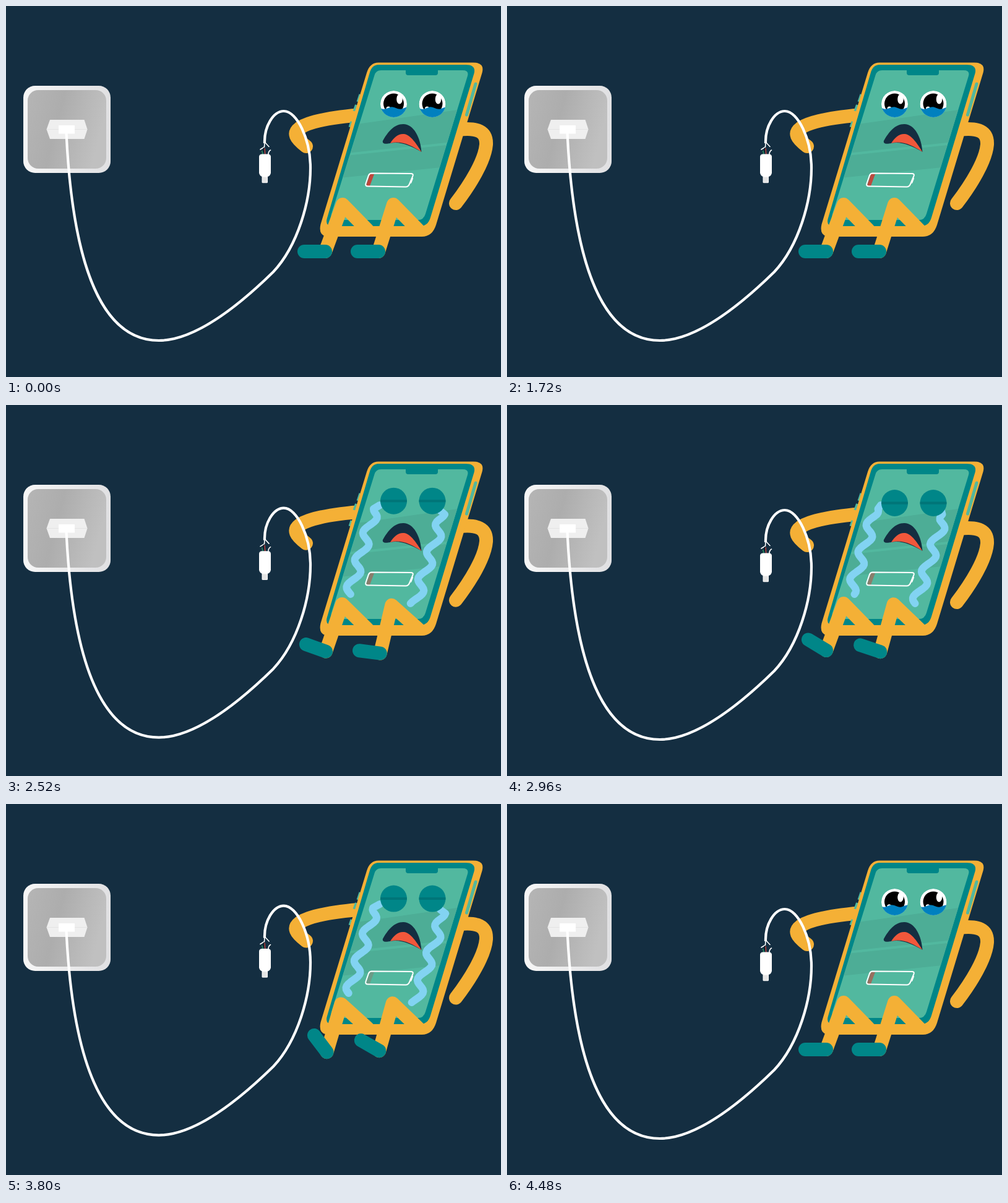
Recreate the animation shown at these times as an HTML page. Size 800 px wide and 600 px high, loop 4520 ms.

```html
<!DOCTYPE html>
<html lang="en">
<head>
<meta charset="utf-8">
<title>Crying phone</title>
<style>
html, body { margin: 0; width: 100%; height: 100%; overflow: hidden; background: #142e41; }
svg { display: block; width: 100vw; height: 100vh; }
.limb { fill: none; stroke: #f4b036; stroke-width: 22; stroke-linecap: round; stroke-linejoin: round; }
.shoe { stroke: #008688; stroke-width: 22; stroke-linecap: round; }
.tear { fill: none; stroke: #82d3f2; stroke-width: 12; stroke-linecap: round; stroke-linejoin: round; }
.wire { fill: none; stroke: #fff; stroke-width: 1.6; stroke-linecap: round; }
</style>
</head>
<body>
<svg viewBox="0 0 800 600">
  <defs>
    <linearGradient id="frame"><stop stop-color="#f6f6f6"/><stop offset="1" stop-color="#e0e0e2"/></linearGradient>
    <linearGradient id="plate" y2=".25"><stop stop-color="#b5b5b5"/><stop offset=".45" stop-color="#adadad"/><stop offset="1" stop-color="#c0c0c0"/></linearGradient>
    <clipPath id="ball"><circle r="21.5"/></clipPath>
    <clipPath id="shut"><rect id="shutBox" x="-23" y="-22" width="46" height="0"/></clipPath>
    <path id="screen" d="M606 104 H738 Q748.500 104 746 113 L678 336 Q675 346 666 346 H532 Q523 346 526 336 L595.500 112 Q598 104 606 104Z"/>
    <clipPath id="glass"><use href="#screen"/></clipPath>
    <g id="eye">
      <g id="open" clip-path="url(#ball)">
        <circle r="21.5" fill="#fff"/>
        <circle cy="-.5" r="16.500"/>
        <ellipse id="shine" cx="9.500" cy="-8" rx="4.800" ry="8" fill="#fff"/>
        <circle id="spark" cx="-9" cy="7" r="3.500" fill="#fff"/>
        <path id="water" fill="#0080bf"/>
      </g>
      <g clip-path="url(#shut)">
        <circle r="21.5" fill="#008688"/>
        <path d="M-21.400 0H21.400" stroke="#007578" stroke-width="4"/>
      </g>
    </g>
  </defs>

  <g id="arms">
    <path class="limb" d="M580 175.500 C535 179 493 185 475 197 C463 206 468 214 485 227"/>
    <path class="limb" d="M730 200 C762 196 777 203 776 224 C774 250 750 289 727 319"/>
  </g>

  <path d="M573 143 L569 155 M566.500 160 L563 170 M559 187 L556 196" stroke="#4fb89f" stroke-width="5"/>
  <path fill="#f4b036" d="M602 91.500 H755 Q774 91.500 769.500 108 L695 354 Q689 373 672 373 H522 Q504 373 508.500 353 L583 108 Q588 91.500 602 91.500Z"/>
  <path d="M759 126 L744.500 176" stroke="#52b89f" stroke-width="5" stroke-linecap="round"/>
  <path fill="#008688" d="M602 95 H743 Q760 95 756.500 109 L686 342 Q682 356 669 356 H528 Q515 356 519 343 L587.500 109 Q591 95 602 95Z"/>
  <use href="#screen" fill="#52b89f"/>
  <g clip-path="url(#glass)" fill="#4dad96">
    <path d="M540 195 L750 165 V217 L540 239Z M540 243 L750 221 V256 L540 278Z"/>
  </g>
  <path fill="#008688" d="M646 103 H698 V108 Q698 112 694 112 H650 Q646 112 646 108Z"/>

  <path class="tear" id="tearL"/>
  <path class="tear" id="tearR"/>
  <g id="eyes">
    <use href="#eye" x="626.500" y="158.500"/>
    <use href="#eye" x="689" y="158.500"/>
  </g>

  <path fill="#142e41" d="M609 218 C617 204 627 191 642 191 C659 191 670 213 671.500 236 C655 226 635 218 621 222 C611 224 608 222 609 218Z"/>
  <path fill="#f1573b" d="M621 222 C627 212 635 206 643 207 C654 208 664 224 671.500 236 C655 225 638 217 621 222Z"/>

  <path id="charge" fill="#c0453b" d="M588 272 H595 L588 291 H584.500 Q581.500 291 583 287Z"/>
  <path fill="none" stroke="#fff" stroke-width="2" d="M591 270.500 L654 271 Q659 271 657.500 275 L652 288 Q650 292.500 646 292.500 L585 291.500 Q580 291.500 581.500 287 L586 274 Q587.500 270.500 591 270.500Z"/>
  <path stroke="#fff" stroke-width="3" stroke-linecap="round" d="M656.500 279 L654 285.500"/>

  <path class="limb" id="legL"/>
  <path class="limb" id="legR"/>
  <path class="shoe" id="shoeL" d="M-34 0H0"/>
  <path class="shoe" id="shoeR" d="M-34 0H0"/>

  <rect x="28" y="129" width="141" height="141" rx="19" fill="url(#frame)"/>
  <rect x="35" y="136" width="127" height="127" rx="17" fill="url(#plate)"/>
  <path fill="#efefef" d="M71 184 H126.500 L131.500 199.500 L126.500 215 H71 L65.500 199.500Z"/>
  <path stroke="#e4e4e4" d="M66 199.500H131"/>
  <rect x="85" y="193" width="26" height="13.500" fill="#fff"/>
  <path id="cable" fill="none" stroke="#fff" stroke-width="4.200"/>

  <g id="plug">
    <path class="wire" d="M418 221 L417.500 228 L411 232 M419 221 L425 227.500"/>
    <path class="wire" stroke-width="1.200" d="M424 242 Q423.500 235 427.500 233"/>
    <path d="M413.500 234 L415.500 241" stroke="#2f9e63" stroke-width="1.300"/>
    <path d="M418 230 L419 243" stroke="#d6453c" stroke-width="1.300"/>
    <path d="M416.500 229 L416.500 236" stroke="#0b1720" stroke-width="1.200"/>
    <rect x="413.500" y="273" width="9.500" height="13.300" rx="1.500" fill="#f4f4f4"/>
    <path d="M416 277V285 M418.300 277V285 M420.600 277V285" stroke="#c9c9c9" stroke-width=".8"/>
    <path fill="#fff" d="M413 239.500 H424 Q428 240 428 244 V270 Q427 275 423 276 H414 Q410 275 409 270 V244 Q409 240 413 239.500Z"/>
  </g>
</svg>
<script>
const LOOP = 4520, SOB = 600, CRY = 1760, CALM = 4360;
const TAU = 2 * Math.PI;
const $ = id => document.getElementById(id);
const set = (id, name, value) => $(id).setAttribute(name, value);
const ramp = (t, from, to) => Math.min(1, Math.max(0, (t - from) / (to - from)));
const ease = k => (1 - Math.cos(Math.PI * k)) / 2;

// A wave runs down a slanted axis; side -1 or 1 mirrors its swing.
function tear(id, side, startX, x, y, slope, length, t, grow) {
  let d = `M${startX} ${y - 3}`;
  for (let v = 3; v <= length * grow; v += 3) {
    const wave = Math.cos(TAU * ((v - 40) / 44 - (t - 2520) / 620));
    const swing = side * 8 * Math.min(1, .3 + v / 18);
    d += `L${(x + slope * v + swing * wave).toFixed(1)} ${y + v}`;
  }
  set(id, "d", d);
  set(id, "visibility", grow > 0 ? "visible" : "hidden");
}

function leg(side, x, bend, angle) {
  const ankleX = x - 27 + 3 * bend - (side === "R" ? -3 : 1), ankleY = 397 + 5 * bend;
  set("leg" + side, "d", `M${x + 40} 362 L${x - 3 * bend} ${321 + 3 * bend} L${ankleX} ${ankleY}`);
  set("shoe" + side, "transform", `translate(${ankleX} ${ankleY}) rotate(${angle})`);
}

function cable(rise) {
  const points = [[108, 425], [157, 541], [247, 541],
    [310, 541], [385, 476], [432, 430], [472, 387], [492, 315], [492, 262],
    [492, 215], [470, 170], [449, 170], [432, 170], [417, 195], [418, 222]];
  const lift = ([x, y]) => `${x} ${y - rise}`;
  set("cable", "d", "M97.500 206 C" + points.map(lift).join(" "));
}

function draw(t) {
  const crying = t > CRY && t < CALM;
  const phase = (t - CRY) / SOB;
  const sobbing = t > CRY && t < CRY + 4 * SOB;
  const bob = sobbing ? (1 - Math.cos(TAU * phase)) / 2 : 0;
  const sway = sobbing ? ((1 + Math.cos(TAU * (phase - .2))) / 2) ** 2 * ramp(t, CRY, CRY + 120) : 0;
  const rise = 6 * bob;

  for (const id of ["arms", "plug", "eyes"]) set(id, "transform", `translate(0 ${-rise})`);
  cable(rise);

  // Feet lift slowly, then drop back together.
  const drop = 1 - ease(ramp(t, 3920, 4440));
  leg("L", 544, bob * bob, 56 * ramp(t, CRY, 3920) * drop);
  leg("R", 626, sway, 30 * Math.sin(Math.PI / 2 * ramp(t, 2260, 3920)) * drop);

  const grow = crying ? ease(ramp(t, CRY, CRY + 320)) * (1 - ramp(t, CALM - 160, CALM)) : 0;
  tear("tearL", -1, 604, 597, 165, -.3, 142, t, grow);
  tear("tearR", 1, 702, 708, 174, -.32, 147, t, grow);

  const lid = Math.min(ramp(t, CRY, CRY + 120), 1 - ramp(t, CALM - 40, CALM + 80));
  set("shutBox", "height", 44 * lid);
  set("open", "visibility", lid === 1 ? "hidden" : "visible");

  const beat = TAU * (t + 10) / 440;
  set("charge", "opacity", (1 + Math.cos(beat)) / 2);
  set("shine", "transform", `rotate(${4 - 4 * Math.cos(beat)} 9.500 -8)`);
  set("spark", "transform", `translate(${.5 * Math.cos(beat)} ${.5 * Math.cos(beat)})`);
  let d = "M-23 23";
  for (let x = -23; x <= 23; x += 2) d += `L${x} ${(6.5 + 1.7 * Math.sin(x * .24 - 1 + .5 * Math.sin(beat))).toFixed(2)}`;
  set("water", "d", d + "L23 23Z");
}

const start = performance.now();
(function tick() {
  draw((performance.now() - start) % LOOP);
  requestAnimationFrame(tick);
})();
</script>
</body>
</html>
```
